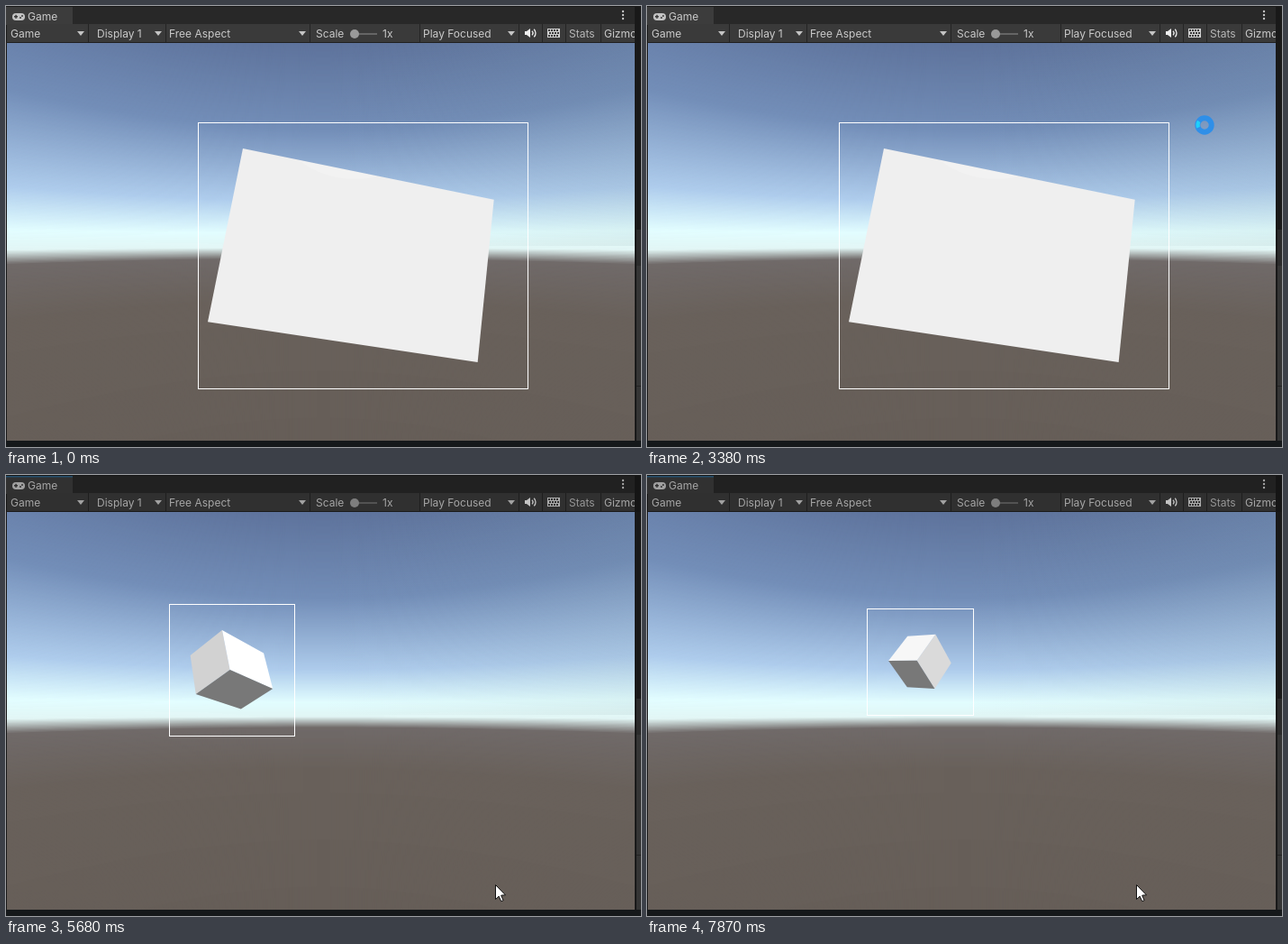
An HTML page with a canvas for the animation above (7.99 s loop, 705 px wide and 489 px high).

```html
<!DOCTYPE html>
<html>
<head>
<meta charset="utf-8">
<style>
html, body { margin: 0; width: 705px; height: 489px; overflow: hidden; background: #191919; }
canvas { display: block; }
</style>
</head>
<body>
<canvas id="stage" width="705" height="489"></canvas>
<script>
const LOOP = 7990;
const FOCAL = 381, CX = 349, HORIZON = 261.5;
const ctx = document.getElementById('stage').getContext('2d');
const mix = (a, b, p) => a.map((v, i) => v + (b[i] - v) * p);
const dot = (a, b) => a.reduce((sum, v, i) => sum + v * b[i], 0);

// Value at x in a list of [x, [values]] stops; ease above 1 slows each stretch towards its end.
function sample(stops, x, ease = 1) {
  let i = 0;
  while (i < stops.length - 2 && x >= stops[i + 1][0]) i++;
  const [x0, a] = stops[i], [x1, b] = stops[i + 1];
  const p = Math.min(1, Math.max(0, (x - x0) / (x1 - x0)));
  return mix(a, b, 1 - (1 - p) ** ease);
}

function rect(g, color, x, y, w, h) {
  g.fillStyle = color;
  g.fillRect(x, y, w, h);
}

function poly(g, color, points) {
  g.fillStyle = color;
  g.beginPath();
  points.forEach(([x, y]) => g.lineTo(x, y));
  g.closePath();
  g.fill();
}

function disc(g, color, x, y, r) {
  g.fillStyle = color;
  g.beginPath();
  g.arc(x, y, r, 0, 7);
  g.fill();
}

function ring(g, color, width, x, y, r, from = 0, to = 7) {
  g.strokeStyle = color;
  g.lineWidth = width;
  g.beginPath();
  g.arc(x, y, r, from, to);
  g.stroke();
}

function label(g, text, x, y, color = '#cacaca', font = '12px Inter, sans-serif') {
  g.fillStyle = color;
  g.font = font;
  g.fillText(text, x, y);
}

// Sky colours by height below the horizon, at the middle column.
const SKY = [
  [-220, [94, 115, 156]], [-125, [115, 142, 184]], [-46, [174, 204, 236]], [-10, [226, 253, 255]],
  [6, [226, 246, 245]], [18, [112, 106, 105]], [64, [105, 97, 91]], [220, [102, 94, 88]]
];

// Lines of equal elevation are hyperbolas, painted from the top down.
function drawSky(g) {
  g.save();
  g.beginPath();
  g.rect(1, 41, 697, 441);
  g.clip();
  for (let k = -221; k < 222; k++) {
    const band = [[705, 489], [0, 489]];
    for (let x = 0; x <= 705; x += 15) {
      band.push([x, k === -221 ? 0 : HORIZON + k * Math.hypot(1, (x - CX) / FOCAL)]);
    }
    poly(g, `rgb(${sample(SKY, k).map(Math.round)})`, band);
  }
  const dusk = g.createLinearGradient(CX, 0, 698, 0);
  dusk.addColorStop(0, 'rgba(90,110,110,0)');
  dusk.addColorStop(1, 'rgba(90,110,110,.08)');
  rect(g, dusk, CX, 41, 349, 225);
  g.restore();
}

function drawToolbar(g) {
  rect(g, '#282828', 0, 1, 698, 19);
  rect(g, '#3c3c3c', 0, 1, 74, 20);
  rect(g, '#3a3a3a', 1, 20, 697, 20);
  rect(g, '#202020', 0, 40, 698, 1);
  for (const x of [91, 177, 337, 459, 569, 595, 621, 660]) rect(g, '#242424', x, 20, 1, 20);

  g.fillStyle = '#c4c4c4';
  g.beginPath();
  g.roundRect(7, 8, 14, 8, 4);
  g.fill();
  rect(g, '#3c3c3c', 9, 11, 4, 1.5);
  rect(g, '#3c3c3c', 10.3, 9.8, 1.5, 4);
  disc(g, '#3c3c3c', 16, 13, 1);
  disc(g, '#3c3c3c', 18, 11, 1);
  label(g, 'Game', 24, 16);
  for (const y of [6, 10, 14]) disc(g, '#c4c4c4', 685, y, 1.2);

  label(g, 'Game', 5, 35);
  label(g, 'Display 1', 101, 35);
  label(g, 'Free Aspect', 181, 35);
  label(g, 'Scale', 344, 35);
  label(g, '1x', 418, 35);
  label(g, 'Play Focused', 463, 35);
  label(g, 'Stats', 625, 35, '#b8b8b8');
  g.save();
  g.beginPath();
  g.rect(0, 20, 698, 20);
  g.clip();
  label(g, 'Gizmos', 664, 35);
  g.restore();
  for (const x of [83, 169, 329, 561]) poly(g, '#c4c4c4', [[x - 4, 28], [x + 4, 28], [x, 33]]);
  rect(g, '#656565', 384, 30, 28, 2);
  disc(g, '#999', 387, 31, 5);

  poly(g, '#eee', [[576, 28], [578, 28], [582, 25], [582, 35], [578, 32], [576, 32]]);
  ring(g, '#eee', 1.3, 582, 30, 3, -0.9, 0.9);
  ring(g, '#eee', 1.3, 582, 30, 6, -0.8, 0.8);
  rect(g, '#d0d0d0', 601, 25, 14, 10);
  for (let row = 0; row < 3; row++) {
    for (let x = 602 + row % 2; x < 613; x += 3) rect(g, '#3a3a3a', x, 26 + row * 3, 2, 2);
  }
}

const backdrop = document.createElement('canvas');
backdrop.width = 705;
backdrop.height = 489;
const back = backdrop.getContext('2d');
rect(back, '#191919', 0, 0, 705, 489);
drawSky(back);
drawToolbar(back);
rect(back, '#2b2b2b', 700, 248, 5, 40);
rect(back, '#353535', 700, 288, 5, 194);
rect(back, '#222', 700, 421, 5, 1);
rect(back, '#15181a', 0, 482, 705, 7);

// The view refreshes 27 times from PLAY on; poses are keyed by refresh:
// screen x, screen y, depth, width, heading, pitch, roll.
const PLAY = 4210, REFRESH = 27 / 3660;
const POSES = [
  [-1, [376, 282.7, 2.51, 1.58, -7.3, -6.3, 10.2]],
  [0, [323.8, 257, 3.45, 1.52, -16.2, 16.1, 22]],
  [4, [271.7, 231, 5.36, 1.42, -25.6, 40.5, 31.3]],
  [16, [239.8, 212, 8.73, 1.2, -36.7, 70, 25.2]],
  [23, [229, 209, 9.1, 1.1, 0, 62, 16]],
  [27, [304, 207.2, 9.3, 1, 40, 49, 7]]
];
const LIGHT = [0.32, -0.77, -0.56];

function turn(a, b, degrees) {
  const r = degrees * Math.PI / 180;
  return [a * Math.cos(r) - b * Math.sin(r), a * Math.sin(r) + b * Math.cos(r)];
}

function rotate([x, y, z], heading, pitch, roll) {
  [x, y] = turn(x, y, roll);
  [y, z] = turn(y, z, pitch);
  [z, x] = turn(z, x, heading);
  return [x, y, z];
}

const project = ([x, y, z]) => [CX + x / z * FOCAL, HORIZON + y / z * FOCAL];

function drawBox(t) {
  const step = Math.max(-1, Math.floor((t - PLAY) * REFRESH));
  const [sx, sy, depth, width, ...angles] = sample(POSES, step, 1.5);
  const center = [(sx - CX) * depth / FOCAL, (sy - HORIZON) * depth / FOCAL, depth];
  const size = [width, 1, 1];
  const axes = [[1, 0, 0], [0, 1, 0], [0, 0, 1]].map(axis => rotate(axis, ...angles));
  const corner = signs => center.map((c, i) => c + dot(signs.map((s, j) => s * size[j] / 2), axes.map(a => a[i])));

  const points = [];
  for (let axis = 0; axis < 3; axis++) {
    for (const side of [-1, 1]) {
      const normal = axes[axis].map(v => v * side);
      const face = [[-1, -1], [1, -1], [1, 1], [-1, 1]].map(([p, q]) => {
        const signs = [0, 0, 0];
        signs[axis] = side;
        signs[(axis + 1) % 3] = p;
        signs[(axis + 2) % 3] = q;
        return corner(signs);
      });
      const flat = face.map(project);
      points.push(...flat);
      if (dot(normal, face[0]) >= 0) continue;
      const shade = Math.min(255, 255 * (0.19 + Math.max(0, dot(normal, LIGHT))) ** (1 / 2.2));
      poly(ctx, `rgb(${shade},${shade},${shade})`, flat);
    }
  }
  if (step < 0) {
    ctx.fillStyle = 'rgba(255,255,255,.2)';
    ctx.beginPath();
    ctx.moveTo(325, 171);
    ctx.quadraticCurveTo(362, 199, 412, 189);
    ctx.fill();
  }

  const xs = points.map(p => p[0]), ys = points.map(p => p[1]);
  const shift = t < 3930 ? 13 : 0;
  const left = Math.round(Math.min(...xs)) - 23.5 + shift, right = Math.round(Math.max(...xs)) + 24.5 + shift;
  const top = Math.round(Math.min(...ys)) - 28.5, bottom = Math.round(Math.max(...ys)) + 29.5;
  ctx.strokeStyle = '#fff';
  ctx.lineWidth = 1;
  ctx.strokeRect(left, top, right - left, bottom - top);
}

function drawDialog(alpha) {
  ctx.save();
  ctx.globalAlpha = alpha;
  ctx.shadowColor = 'rgba(0,0,0,.4)';
  ctx.shadowBlur = 7;
  ctx.shadowOffsetY = 1;
  rect(ctx, '#f0f0f0', 500, 44, 220, 92);
  ctx.shadowColor = 'transparent';
  rect(ctx, '#fff', 500, 44, 220, 30);
  rect(ctx, '#bcbcbc', 508, 85, 210, 15);
  rect(ctx, '#e4e4e4', 509, 86, 210, 13);
  label(ctx, 'Reload Script Assemblies', 508, 63, '#999', '12.4px "Noto Sans", sans-serif');
  label(ctx, 'Reload Script Assemblies', 510, 121, '#000', '10.5px "Liberation Sans", sans-serif');
  ctx.restore();
}

function drawArrow([x, y]) {
  const shape = [[0, 0], [0, 16], [3.7, 12.6], [6.2, 18.2], [8.6, 17.2], [6.2, 11.6], [11, 11.3]];
  poly(ctx, '#fff', shape.map(([u, v]) => [x + 0.5 + u, y - 0.5 + v]));
  ctx.strokeStyle = '#111';
  ctx.lineWidth = 1;
  ctx.stroke();
}

function drawSpinner([x, y], t) {
  const angle = Math.PI + (t - 3380) / 160;
  ring(ctx, '#2f8fe8', 6, x, y, 7.7);
  ring(ctx, '#1fd0fb', 4, x, y, 7.5, angle - 0.35, angle + 0.6);
}

const ENTER = [[1270, [634, 2]], [1870, [660, 48]], [2020, [653, 52]]];
const WAIT = [[2965, [640, 85]], [3240, [619, 132]]];
const RETURN = [[4480, [673, 466]], [4750, [543, 455]]];
const hold = (t, start, gap) => start + Math.floor((t - start) / gap) * gap;

function draw(t) {
  ctx.drawImage(backdrop, 0, 0);
  if (t >= 3660) {
    rect(ctx, 'rgba(0,0,0,.18)', 0, 0, 705, 41);
    rect(ctx, '#24506f', 0, 1, 74, 1.5);
  }
  drawBox(t);
  if (t >= 810 && t < 2965) drawDialog(t < 960 || t >= 2830 ? 0.6 : 1);
  if (t >= 1270 && t < 2965) drawArrow(sample(ENTER, hold(t, 1270, 150)));
  if (t >= 2965 && t < 3660) {
    const held = Math.min(3380, hold(t, 2965, 137.5));
    drawSpinner(sample(WAIT, held), held);
  }
  if (t >= 4480) drawArrow(sample(RETURN, hold(t, 4480, 135)));
}

const begin = performance.now();
function tick() {
  draw((performance.now() - begin) % LOOP);
  requestAnimationFrame(tick);
}
tick();
</script>
</body>
</html>
```
